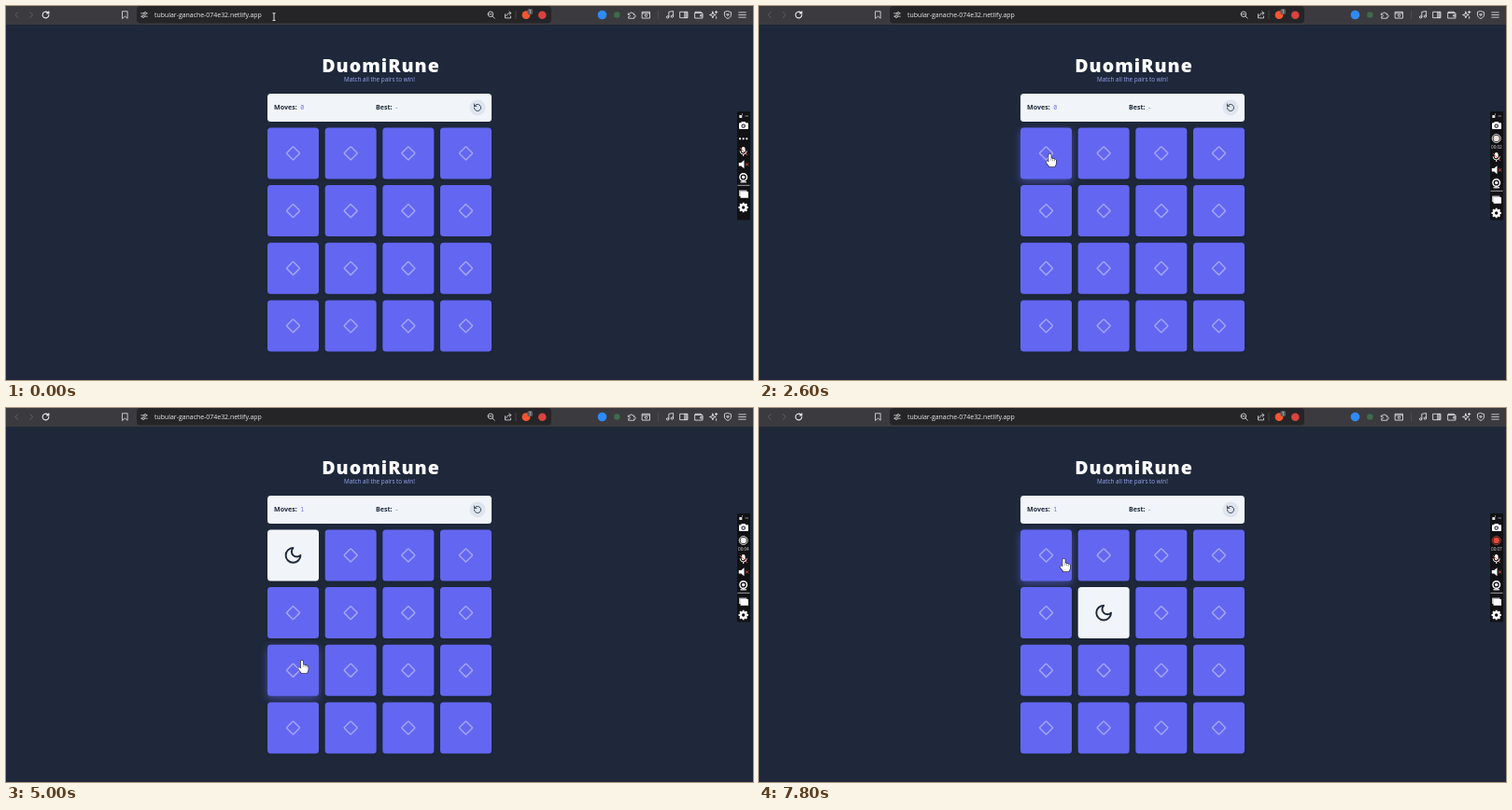
Animation, 800 px wide and 401 px high, one loop 8000 ms. Source, as an HTML page with a canvas:

```html
<!DOCTYPE html>
<html lang="en">
<head>
<meta charset="utf-8">
<title>Memory game</title>
<style>
html, body { margin: 0; width: 100%; height: 100%; overflow: hidden; background: #1e283a; }
canvas { display: block; width: 800px; height: 401px; }
</style>
</head>
<body>
<canvas id="stage"></canvas>
<script>
const canvas = document.getElementById('stage');
const ctx = canvas.getContext('2d');
const dpr = window.devicePixelRatio || 1;
canvas.width = 800 * dpr;
canvas.height = 401 * dpr;

const LOOP = 8000, STEP = 200, REC_START = 400, FLIP = 500;
const SANS = '"Open Sans", "Noto Sans", sans-serif';
const MONO = '"Noto Sans Mono", monospace';
const INK = '#1e293b', INDIGO = '#6366f1', PALE = '#f1f5f9', LIGHT = '#e4e4e7';

// Icons on a 24 unit grid
const ICON = {
  back: 'M16 3 7 12l9 9',
  forward: 'M8 3l9 9-9 9',
  reload: 'M21 12a9 9 0 1 1-3-6.7L21 8M21 2v6h-6',
  restart: 'M3 12a9 9 0 1 0 3-6.7L3 8M3 2v6h6',
  bookmark: 'M5 2h14v20l-7-6-7 6z',
  sliders: 'M2 7h9M19 7h3M2 17h3M13 17h9M11 7a4 4 0 1 0 8 0a4 4 0 1 0-8 0M5 17a4 4 0 1 0 8 0a4 4 0 1 0-8 0',
  zoom: 'M3 10a7.5 7.5 0 1 0 15 0a7.5 7.5 0 1 0-15 0M16 16l6 6M7 10h7',
  share: 'M4 10v11h16v-5M8 15c0-6 4-8 12-8M16 2l5 5-5 5',
  puzzle: 'M3 8h5a3 3 0 1 1 6 0h5v5a3 3 0 1 1 0 5v4H3v-5a3 3 0 1 0 0-5z',
  box: 'M2 4h20v17H2zM2 8h20M9 14a3 3 0 1 0 6 0a3 3 0 1 0-6 0',
  music: 'M9 18V4l12-2v14M3 18a3 3 0 1 0 6 0a3 3 0 1 0-6 0M15 16a3 3 0 1 0 6 0a3 3 0 1 0-6 0',
  panel: 'M2 4h20v16H2zM14 4v16M17 4v16M20 4v16',
  wallet: 'M2 7V4h16v3M2 7h20v14H2zM22 12h-6v4h6',
  sparkle: 'M11 4l2 6 6 2-6 2-2 6-2-6-6-2 6-2zM20 2v6M17 5h6M20 17v4',
  shield: 'M12 2l9 3v6c0 6-4 9-9 11-5-2-9-5-9-11V5zM9 11l3 4 3-4z',
  menu: 'M2 5h20M2 12h20M2 19h20',
  moon: 'M12 3a6 6 0 0 0 9 9 9 9 0 1 1-9-9Z',
  heart: 'M12 21C5 15 2 12 2 8a5 5 0 0 1 10-2 5 5 0 0 1 10 2c0 4-3 7-10 13z'
};

// Cursor tip over time: [ms, x, y]
const PATH = [
  [0, 287, 11.5], [400, 287, 11.5], [1000, 316.5, 161.5], [1600, 311.5, 158.5],
  [3200, 311.5, 158.5], [4000, 362.5, 245], [4200, 362.5, 245], [4800, 317, 270.5],
  [5300, 317, 270.5], [5900, 373, 209.5], [7100, 373, 209.5], [7700, 326.5, 161.5], [8000, 326.5, 161.5]
];

const TURNS = {
  0: { icon: 'moon', up: 2900, down: 5785 },
  8: { icon: 'heart', up: 4990, down: 5785 },
  5: { icon: 'moon', up: 6700, down: Infinity }
};

const clamp = v => Math.max(0, Math.min(1, v));
const smooth = v => v * v * (3 - 2 * v);

// cubic-bezier(.25, .1, .25, 1)
function ease(p) {
  if (p <= 0) return 0;
  if (p >= 1) return 1;
  let lo = 0, hi = 1, u = 0.5;
  const curve = (a, b) => 3 * u * (1 - u) ** 2 * a + 3 * u * u * (1 - u) * b + u ** 3;
  for (let i = 0; i < 18; i++) {
    u = (lo + hi) / 2;
    if (curve(0.25, 0.25) < p) lo = u; else hi = u;
  }
  return curve(0.1, 1);
}

function rect(x, y, w, h, r, color) {
  ctx.fillStyle = color;
  ctx.beginPath();
  ctx.roundRect(x, y, w, h, r);
  ctx.fill();
}

function disc(x, y, r, color) {
  ctx.fillStyle = color;
  ctx.beginPath();
  ctx.arc(x, y, r, 0, Math.PI * 2);
  ctx.fill();
}

function ring(x, y, r, width, color) {
  ctx.strokeStyle = color;
  ctx.lineWidth = width;
  ctx.beginPath();
  ctx.arc(x, y, r, 0, Math.PI * 2);
  ctx.stroke();
}

function text(str, x, y, font, color, spacing = '0px') {
  ctx.font = font;
  ctx.fillStyle = color;
  ctx.letterSpacing = spacing;
  ctx.fillText(str, x, y);
}

function line(x1, y1, x2, y2, width, color) {
  ctx.strokeStyle = color;
  ctx.lineWidth = width;
  ctx.beginPath();
  ctx.moveTo(x1, y1);
  ctx.lineTo(x2, y2);
  ctx.stroke();
}

function icon(name, x, y, size, color = LIGHT, width = 2.2) {
  ctx.save();
  ctx.translate(x, y);
  ctx.scale(size / 24, size / 24);
  ctx.translate(-12, -12);
  ctx.strokeStyle = color;
  ctx.lineWidth = width;
  ctx.lineCap = ctx.lineJoin = 'round';
  ctx.stroke(new Path2D(ICON[name]));
  ctx.restore();
}

function drawToolbar() {
  rect(0, 0, 800, 20, 0, '#3b3b3f');
  rect(140, 0, 444, 18.5, 4, '#252528');
  icon('back', 11.5, 9.5, 8, '#6d6d72');
  icon('forward', 27, 9.5, 8, '#6d6d72');
  icon('reload', 42.5, 9.5, 9, '#f4f4f5', 2.8);
  icon('bookmark', 127.5, 9.5, 9);
  icon('sliders', 148, 9.5, 8);
  text('tubular-ganache-074e32.netlify.app', 159, 11.8, `6.95px ${SANS}`, '#ececee');
  icon('zoom', 519.5, 9.5, 9);
  icon('share', 537.5, 9.5, 9);
  line(546, 5, 546, 14, 0.7, '#55555a');
  disc(557, 9.7, 4.4, '#f4562f');
  rect(558.5, 3, 5.5, 6, 1.5, '#5c5c62');
  text('1', 560, 8, `5px ${SANS}`, '#e8e8ea');
  disc(574.3, 9.7, 4.3, '#d8433f');
  disc(638.5, 9.5, 4.8, '#2f8af5');
  disc(654.3, 9.5, 3.2, '#3e6b4b');
  icon('puzzle', 670, 9.5, 9);
  icon('box', 685.5, 9.5, 9.5);
  line(698.5, 5, 698.5, 14, 0.7, '#55555a');
  icon('music', 711, 9.5, 9.5);
  icon('panel', 726, 9.5, 9.5);
  icon('wallet', 742, 9.5, 9.5);
  icon('sparkle', 757.3, 9.5, 10);
  icon('shield', 773, 9.5, 9.5);
  icon('menu', 788.5, 9.5, 9);
}

function drawHeader(t) {
  text('DuomiRune', 338.2, 70.8, `800 19.6px ${SANS}`, '#fff', '1px');
  text('Match all the pairs to win!', 362, 81.3, `6.35px ${SANS}`, '#9aa5f3');
  rect(280, 94, 240, 30, 3.5, PALE);
  const label = `700 7.1px ${SANS}`, value = `6.8px ${MONO}`;
  text('Moves:', 287, 111.3, label, INK);
  text(t >= 4900 ? '1' : '0', 315.2, 111.3, value, '#7477e8');
  text('Best:', 396, 111.3, label, INK);
  text('-', 416.3, 111.3, value, '#7477e8');
  disc(505, 109, 8.5, '#dfe5ee');
  icon('restart', 505, 109, 9.5, '#334155', 2.4);
}

function turnAngle(i, t) {
  const turn = TURNS[i];
  if (!turn) return 0;
  return Math.PI * (ease((t - turn.up) / FLIP) - ease((t - turn.down) / FLIP));
}

function cardBox(i) {
  const pitch = 61.67;
  return { x: 280 + (i % 4) * pitch, y: 130.4 + Math.floor(i / 4) * pitch, size: 55 };
}

function cardAt(p) {
  for (let i = 0; i < 16; i++) {
    const b = cardBox(i);
    if (p.x >= b.x && p.x <= b.x + b.size && p.y >= b.y && p.y <= b.y + b.size) return i;
  }
  return -1;
}

function drawCard(i, t, hovered) {
  const { x, y, size } = cardBox(i);
  const half = size / 2;
  const cos = Math.cos(turnAngle(i, t));
  const faceUp = cos < 0;
  ctx.save();
  ctx.translate(x + half, y + half);
  ctx.scale(Math.max(0.01, Math.abs(cos)), 1);
  ctx.shadowColor = hovered ? 'rgba(99,102,241,.55)' : 'rgba(0,0,0,.14)';
  ctx.shadowBlur = (hovered ? 9 : 3) * dpr;
  ctx.shadowOffsetY = (hovered ? 3 : 1) * dpr;
  rect(-half, -half, size, size, 3.5, faceUp ? PALE : INDIGO);
  ctx.shadowColor = 'transparent';
  if (faceUp) {
    icon(TURNS[i].icon, 0, 0, 21, INK, 2.2);
  } else {
    ctx.rotate(Math.PI / 4);
    ctx.strokeStyle = '#a3a5f7';
    ctx.lineWidth = 1.5;
    ctx.beginPath();
    ctx.roundRect(-5.1, -5.1, 10.2, 10.2, 0.8);
    ctx.stroke();
  }
  ctx.restore();
}

function drawGear(x, y) {
  for (let k = 0; k < 8; k++) {
    const a = k * Math.PI / 4;
    line(x, y, x + 5.2 * Math.cos(a), y + 5.2 * Math.sin(a), 2, '#fff');
  }
  disc(x, y, 4.1, '#fff');
  disc(x, y, 1.7, '#111');
}

function drawRecorder(t) {
  const on = t >= REC_START;
  const x = 789.7;
  rect(783, 113, 14, 116.5, 1, '#111113');
  rect(785.3, 117, 3, 3, 0.5, '#ddd');
  line(788, 116, 789, 116, 1, '#ddd');
  line(791.5, 118, 795, 118, 0.8, '#aaa');
  rect(785, 125.2, 10, 6.7, 1, '#fff');
  rect(787.5, 124, 4.5, 2, 0.5, '#fff');
  disc(x, 128.6, 2.2, '#111');
  disc(x, 128.6, 1.2, '#fff');

  if (on) {
    const red = t < 1500 ? 1 : clamp(0.5 + 1.2 * Math.cos(Math.PI * t / 1000));
    ring(x, 142, 4.5, 0.9, red > 0.5 ? '#b9473d' : '#f2f2f2');
    disc(x, 142, 3.2, `rgb(${245 - 15 * red},${245 - 170 * red},${245 - 185 * red})`);
    const sec = Math.floor((t - REC_START) / 1000);
    text('00:0' + sec, 784, 152.8, `4.6px ${SANS}`, '#ddd');
  } else {
    for (const dx of [-3.6, 0, 3.6]) disc(x + dx, 142.3, 1.1, '#fff');
  }

  ctx.save();
  ctx.translate(0, on ? 6 : 0);
  rect(787.8, 151, 3.8, 6.2, 1.9, '#fff');
  ctx.strokeStyle = '#fff';
  ctx.lineWidth = 0.9;
  ctx.beginPath();
  ctx.arc(x, 155.3, 3.6, 0, Math.PI);
  ctx.stroke();
  line(x, 159, x, 161, 1, '#fff');
  line(786, 152, 794, 160, 0.9, '#e3563e');

  ctx.fillStyle = '#fff';
  ctx.fill(new Path2D('M784.8 168h2.5l3.2-2.8v9l-3.2-2.8h-2.5z'));
  line(792, 168.3, 795, 171.3, 0.9, '#e3563e');
  line(795, 168.3, 792, 171.3, 0.9, '#e3563e');

  ring(x, 183.5, 3.8, 1.4, '#fff');
  disc(x, 183.5, 1.7, '#fff');
  line(786.5, 188.8, 793, 188.8, 1.2, '#fff');
  line(783.5, 192.3, 796.5, 192.3, 0.8, '#c9c9c9');
  rect(785, 197.5, 8.5, 6.5, 0.5, '#bbb');
  rect(786.5, 199, 8.5, 6.7, 0.5, '#fff');
  drawGear(x, 216);
  ctx.restore();
}

function cursorAt(t) {
  let k = 1;
  while (k < PATH.length - 1 && PATH[k][0] < t) k++;
  const [t0, x0, y0] = PATH[k - 1], [t1, x1, y1] = PATH[k];
  const p = smooth(clamp((t - t0) / (t1 - t0)));
  return { x: x0 + (x1 - x0) * p, y: y0 + (y1 - y0) * p };
}

const HAND = new Path2D('M-1.2 1Q0-.8 1.2 1V5Q2.5 4.2 3.1 5.5Q4.5 4.8 5 6.2Q6.6 5.8 6.6 7.5V10Q6.4 12 5.2 13.8H-.4L-3.8 9.2Q-4.2 7.5-2.5 7.8L-1.2 9Z');
const ARROW = new Path2D('M0 0V11L2.6 8.7 4.3 12.4 6 11.6 4.3 8H8Z');

function drawCursor(p, hovered) {
  ctx.save();
  ctx.translate(p.x, p.y);
  if (p.y < 20) {
    line(0, -3.5, 0, 3.8, 0.9, '#fff');
    line(-1.5, -3.8, 1.5, -3.8, 0.8, '#fff');
    line(-1.5, 4, 1.5, 4, 0.8, '#fff');
  } else {
    const shape = hovered >= 0 ? HAND : ARROW;
    ctx.lineJoin = 'round';
    ctx.lineWidth = 1.1;
    ctx.strokeStyle = '#16161c';
    ctx.fillStyle = '#fff';
    ctx.stroke(shape);
    ctx.fill(shape);
    if (hovered >= 0) {
      line(1.2, 5, 1.2, 7.3, 0.5, '#555');
      line(3.1, 5.8, 3.1, 7.6, 0.5, '#555');
      line(5, 6.4, 5, 8, 0.5, '#555');
    }
  }
  ctx.restore();
}

function draw(t) {
  ctx.setTransform(dpr, 0, 0, dpr, 0, 0);
  rect(0, 0, 800, 401, 0, '#1e283a');
  drawToolbar();
  drawHeader(t);
  const pointer = cursorAt(t);
  const hovered = cardAt(pointer);
  for (let i = 0; i < 16; i++) drawCard(i, t, i === hovered);
  drawRecorder(t);
  drawCursor(pointer, hovered);
}

const start = performance.now();
function tick() {
  const t = Math.max(0, performance.now() - start) % LOOP;
  draw(Math.floor(t / STEP) * STEP);
  requestAnimationFrame(tick);
}
tick();
</script>
</body>
</html>
```
